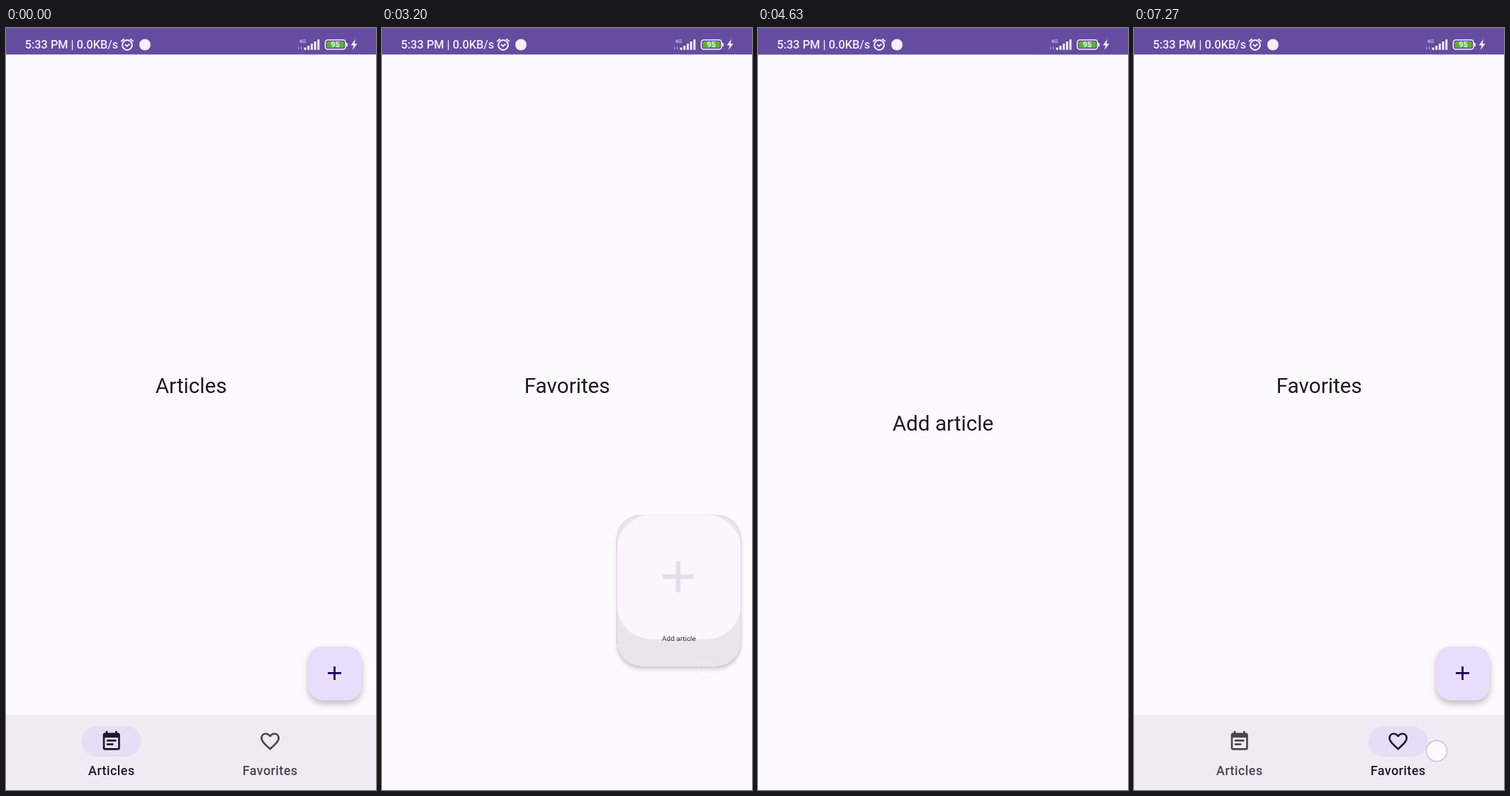
Animation, 522 px wide and 1073 px high, one loop 7310 ms. Source, as an HTML page:

```html
<!DOCTYPE html>
<html lang="en">
<head>
<meta charset="utf-8">
<title>Articles app</title>
<style>
  html, body { margin: 0; width: 100%; height: 100%; overflow: hidden; background: #fdfafd; }
  svg { display: block; width: 100%; height: 100%; }
  text { font-family: Roboto, "Open Sans", sans-serif; text-anchor: middle; fill: #1c1b1f; }
  .title { font-size: 29.7px; }
  .label { font-size: 18px; font-weight: 500; letter-spacing: .4px; fill: inherit; }
  #status text { fill: #f3effa; }
</style>
</head>
<body>
<svg viewBox="0 0 522 1073">
  <defs>
    <g id="fabShape">
      <rect width="76" height="76" rx="21" fill="#e8ddfa"/>
      <path d="M28 37.7h19M37.5 28.2v19" stroke="#21005d" stroke-width="2.8"/>
    </g>
    <clipPath id="clip"><rect id="clipBox"/></clipPath>
  </defs>
  <rect width="522" height="1073" fill="#fdfafd"/>

  <g id="articles"><text class="title" x="261.2" y="513.7">Articles</text></g>
  <g id="favorites"><text class="title" x="261.2" y="513.7">Favorites</text></g>
  <use id="fab" href="#fabShape" x="426" y="870.7" style="filter:drop-shadow(0 5px 4px rgba(60,50,70,.3))"/>

  <g id="morph">
    <rect id="box" fill="#fdfafd"/>
    <g clip-path="url(#clip)">
      <g id="content">
        <rect id="base" width="522" height="1040"/>
        <use href="#fabShape" transform="scale(6.8684)"/>
        <g id="page">
          <rect width="522" height="1040" fill="#fdfafd"/>
          <text class="title" x="261" y="530">Add article</text>
        </g>
      </g>
    </g>
  </g>

  <g id="nav">
    <rect y="967" width="522" height="106" fill="#f0ebf3"/>
    <g id="tab0" transform="translate(148.8 1004.5)">
      <rect class="pill" x="-42" y="-21.5" width="84" height="43" rx="21.5" fill="#e7ddf6"/>
      <path transform="scale(1.34) translate(-12 -11.9)" d="M17 10H7v2h10v-2zm2-7h-1V1h-2v2H8V1H6v2H5c-1.1 0-2 .9-2 2v14c0 1.1.9 2 2 2h14c1.1 0 2-.9 2-2V5c0-1.1-.9-2-2-2zm0 16H5V8h14v11zm-5-5H7v2h7v-2z"/>
      <text class="label" y="47.6">Articles</text>
    </g>
    <g id="tab1" transform="translate(372.6 1004.5)">
      <rect class="pill" x="-42" y="-21.5" width="84" height="43" rx="21.5" fill="#e7ddf6"/>
      <path transform="scale(1.34) translate(-12 -12)" d="M16.5 3c-1.74 0-3.41.81-4.5 2.09C10.91 3.81 9.24 3 7.5 3 4.42 3 2 5.42 2 8.5c0 3.78 3.4 6.86 8.55 11.54L12 21.35l1.45-1.32C18.6 15.36 22 12.28 22 8.5 22 5.42 19.58 3 16.5 3zm-4.4 15.55l-.1.1-.1-.1C7.14 14.24 4 11.39 4 8.5 4 6.5 5.5 5 7.5 5c1.54 0 3.04.99 3.57 2.36h1.87C13.46 5.99 14.96 5 16.5 5c2 0 3.5 1.5 3.5 3.5 0 2.89-3.14 5.74-7.9 10.05z"/>
      <text class="label" y="47.6">Favorites</text>
    </g>
  </g>

  <circle id="dot" r="14.6" fill="#fcfafd" stroke="#cbc8e0" stroke-width="1.8"/>

  <g id="status">
    <rect width="522" height="37.3" fill="#654ca1"/>
    <text x="92.5" y="29.3" font-size="16.3" font-weight="500">5:33 PM | 0.0KB/s</text>
    <g fill="none" stroke="#f3effa" stroke-width="2">
      <circle cx="171" cy="24" r="6.9"/>
      <path d="M162.3 19l4.4-3.8M179.7 19l-4.4-3.8M168 23l2.6 2.6 3.8-3.2"/>
      <rect x="450.5" y="16.8" width="28.5" height="13.2" rx="3.5" stroke-width="1.6"/>
    </g>
    <g fill="#f3effa">
      <circle cx="196" cy="23.5" r="8"/>
      <path d="M420.5 27.5h3v3.2h-3zM425.2 25h3v5.7h-3zM429.9 22h3v8.7h-3zM434.6 19h3v11.7h-3zM439.3 16h3v14.7h-3z"/>
      <path d="M480.2 21h1.8v5h-1.8zM493 15.5l-6.5 9h3.8l-1.3 6.5 6.5-9h-3.8z"/>
    </g>
    <path d="M412.5 30v-4M416.5 26v4" stroke="#a99bd0" stroke-width="1.2"/>
    <rect x="452.8" y="19" width="23.8" height="8.8" rx="1.5" fill="#5ab52e"/>
    <text x="464.5" y="27.4" font-size="11" font-weight="700">95</text>
    <text x="418.5" y="20.5" font-size="7.5">4G</text>
  </g>
</svg>
<script>
const LOOP = 7310;
const SWITCH = 1830;                      // tab change
const OPEN = 3077, CLOSE = 4755, MORPH = 1063;
const $ = id => document.getElementById(id);
const ramp = (t, a, b) => Math.min(1, Math.max(0, (t - a) / (b - a)));
const mix = (a, b, p) => a + (b - a) * p;
const set = (el, attrs) => { for (const k in attrs) el.setAttribute(k, attrs[k]); };
const show = (el, on) => el.style.display = on ? '' : 'none';

// cubic-bezier(.2, 0, 0, 1)
function ease(u) {
  let lo = 0, hi = 1;
  for (let i = 0; i < 24; i++) {
    const s = (lo + hi) / 2;
    if (.6 * s * (1 - s) ** 2 + s ** 3 < u) lo = s; else hi = s;
  }
  return lo * lo * (3 - 2 * lo);
}

// Touches: x, y, down, fade start, fade end
const touches = [
  [343, 1003, 1700, 1800, 1960],
  [457, 900, 2930, 3060, 3215],
  [426, 1012, 6600, 6690, 6800],
  [427, 1018, 7230, LOOP, LOOP + 1]
];

function drawTabs(t) {
  const p = ease(ramp(t, SWITCH, SWITCH + 470));
  const second = t >= SWITCH;
  [1 - p, p].forEach((v, i) => {
    const tab = $('tab' + i), pill = tab.querySelector('.pill');
    const active = second === (i === 1);
    tab.setAttribute('fill', active ? '#1d192b' : '#49454f');
    set(pill, {
      transform: `scale(${mix(.4, 1, v)} 1)`,
      opacity: active ? ramp(v, 0, .2) : ramp(v, .8, 1)
    });
  });

  const u = ramp(t, SWITCH, SWITCH + 400), inn = ease(ramp(u, .3, 1));
  const k = mix(.92, 1, inn);
  set($('articles'), { opacity: 1 - ramp(u, 0, .3) });
  set($('favorites'), {
    opacity: inn,
    transform: `translate(261 502) scale(${k}) translate(-261 -502)`
  });
}

function drawMorph(t) {
  const closing = t >= CLOSE;
  const q = ease(closing ? ramp(t, CLOSE, CLOSE + MORPH) : ramp(t, OPEN, OPEN + MORPH));
  const p = closing ? 1 - q : q;
  const active = t >= OPEN && t < CLOSE + MORPH;
  show($('morph'), active);
  show($('fab'), !active);
  show($('nav'), t < OPEN || closing);
  if (!active) return;

  const x = mix(426, 0, p), y = mix(870.7, 37.3, p), width = mix(76, 522, p);
  const mask = closing ? 1 - ramp(q, 0, .9) : p;
  const height = mix(width, width * 1035.7 / 522, mask);
  const round = closing ? ramp(q, .3, .9) : 1 - ramp(p, 0, .75);
  const rx = 21 * width / 76 * round;
  const alpha = closing ? 1 - ramp(q, .6, .9) : ramp(p, 0, .25);
  const bounds = { x, y, width, height, rx };
  set($('clipBox'), bounds);
  set($('box'), bounds);
  set($('base'), { fill: closing ? '#fdfafd' : '#504c55' });
  $('box').style.filter =
    `drop-shadow(0 ${mix(5, .5, p)}px ${mix(3, 1, p)}px rgba(80,65,120,.26))`;
  set($('content'), { transform: `translate(${x} ${y}) scale(${width / 522})` });
  set($('page'), { opacity: alpha });
}

function drawTouch(t) {
  const hit = touches.find(([, , down, , end]) => t >= down && t < end);
  show($('dot'), hit);
  if (hit) set($('dot'), { cx: hit[0], cy: hit[1], opacity: 1 - ramp(t, hit[3], hit[4]) });
}

const start = performance.now();
function frame(now) {
  const t = Math.max(0, now - start) % LOOP;
  drawTabs(t);
  drawMorph(t);
  drawTouch(t);
  requestAnimationFrame(frame);
}
frame(start);
</script>
</body>
</html>
```
